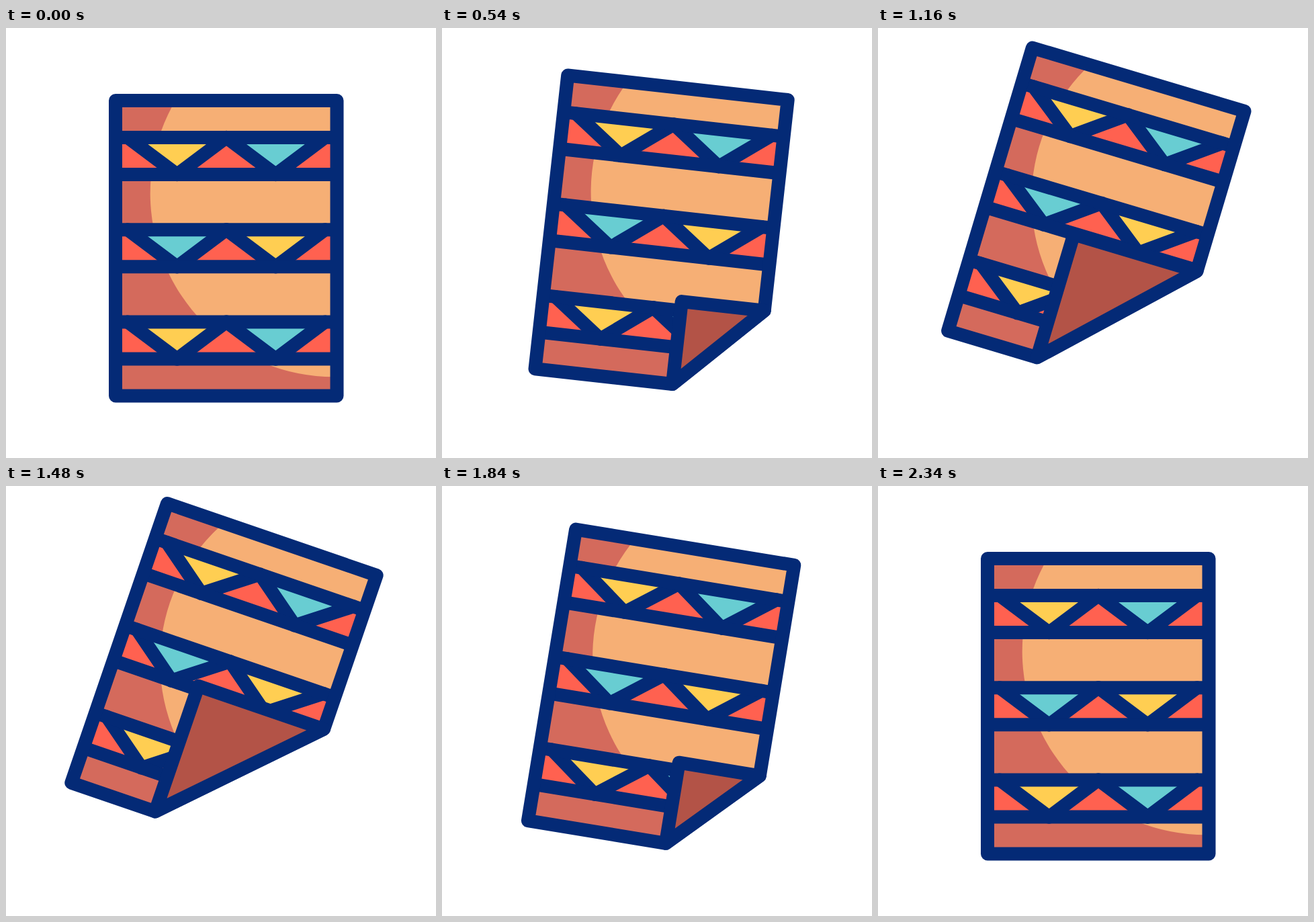
Write an HTML page that moves like this. It is 640 px wide and 640 px high and loops after 2.4 s.

```html
<!DOCTYPE html>
<html lang="en">
<head>
<meta charset="utf-8">
<title>Folding rug</title>
<style>
  html, body { margin: 0; width: 100%; height: 100%; overflow: hidden; background: #fff; }
  svg { display: block; width: 100vw; height: 100vh; }
  .line { fill: none; stroke: #042a76; stroke-width: 20; stroke-linejoin: round; stroke-linecap: round; }
  #flap { fill: #b35347; }
</style>
</head>
<body>
<svg viewBox="0 0 640 640">
  <clipPath id="cut"><polygon id="cutShape"/></clipPath>
  <g id="rug">
    <g clip-path="url(#cut)">
      <rect x="163" y="108" width="329.5" height="439.5" fill="#d46a5c"/>
      <circle cx="488" cy="246" r="273.3" fill="#f6af75"/>
      <g id="bands"></g>
    </g>
    <polygon id="edge" class="line"/>
    <polygon id="flap" class="line"/>
  </g>
</svg>
<script>
const LOOP = 2400;
const L = 163, T = 108, R = 492.5, B = 547.5;
const RED = '#ff6150', YELLOW = '#ffce52', TEAL = '#68cdd2';

// time, tilt in degrees, lift, fold size
const KEYS = [
  [100, 0, 0, 0],
  [200, 0.45, 1.5, 26],
  [300, 1.65, 5.6, 55],
  [640, 8.5, 27.2, 149],
  [780, 11.55, 36.6, 178],
  [960, 13.2, 40, 186],
  [1160, 16.6, 40, 191],
  [1410, 19.1, 40, 198],
  [1480, 18.95, 39.8, 197.5],
  [1720, 13.3, 26.9, 152],
  [1840, 9.35, 19.6, 122],
  [2060, 2.9, 6, 62],
  [2180, 0.7, 1.5, 29],
  [2260, 0.15, 0.3, 10],
  [2340, 0, 0, 0]
];

const $ = id => document.getElementById(id);

function slope(i, c) {
  if (i === 0 || i === KEYS.length - 1) return 0;
  const rate = j => (KEYS[j + 1][c] - KEYS[j][c]) / (KEYS[j + 1][0] - KEYS[j][0]);
  const a = rate(i - 1), b = rate(i);
  return a * b <= 0 ? 0 : 2 * a * b / (a + b);
}

// Monotone cubic through one column of the table
function value(t, c) {
  const last = KEYS.length - 1;
  if (t <= KEYS[0][0]) return KEYS[0][c];
  if (t >= KEYS[last][0]) return KEYS[last][c];
  const i = KEYS.findIndex(k => k[0] > t) - 1;
  const p = KEYS[i], q = KEYS[i + 1], d = q[0] - p[0];
  const u = (t - p[0]) / d, v = 1 - u;
  return p[c] * v * v * (1 + 2 * u) + q[c] * u * u * (3 - 2 * u)
    + d * u * v * (slope(i, c) * v - slope(i + 1, c) * u);
}

function band(y, first, second) {
  const low = y + 55, step = 73.4;
  const xs = [-2, -1, 0, 1, 2].map(k => 328 + k * step);
  const zig = xs.map((x, i) => `${x},${i % 2 ? low : y}`).join(' ');
  const tri = (i, fill) => `<polygon points="${xs[i - 1]},${y} ${xs[i + 1]},${y} ${xs[i]},${low}" fill="${fill}"/>`;
  return `<rect x="${L}" y="${y}" width="${R - L}" height="55" fill="${RED}"/>`
    + tri(1, first) + tri(3, second)
    + `<polyline class="line" points="${zig}"/>`
    + `<path class="line" d="M${L} ${y}H${R}M${L} ${low}H${R}"/>`;
}

$('bands').innerHTML = band(163, YELLOW, TEAL) + band(300.2, TEAL, YELLOW) + band(437.5, YELLOW, TEAL);

function draw(t) {
  const tilt = value(t, 1), lift = value(t, 2), s = value(t, 3);
  const fold = `${R},${B - s} ${R - s},${B}`;
  const shape = `${L},${T} ${R},${T} ${fold} ${L},${B}`;
  $('rug').setAttribute('transform', `translate(0 ${-lift}) rotate(${tilt} 328 317.5)`);
  $('cutShape').setAttribute('points', shape);
  $('edge').setAttribute('points', shape);
  $('flap').setAttribute('points', `${fold} ${R - s},${B - s}`);
  $('flap').style.display = s < 0.5 ? 'none' : '';
}

const start = performance.now();
function tick() {
  draw((performance.now() - start) % LOOP);
  requestAnimationFrame(tick);
}
tick();
</script>
</body>
</html>
```
